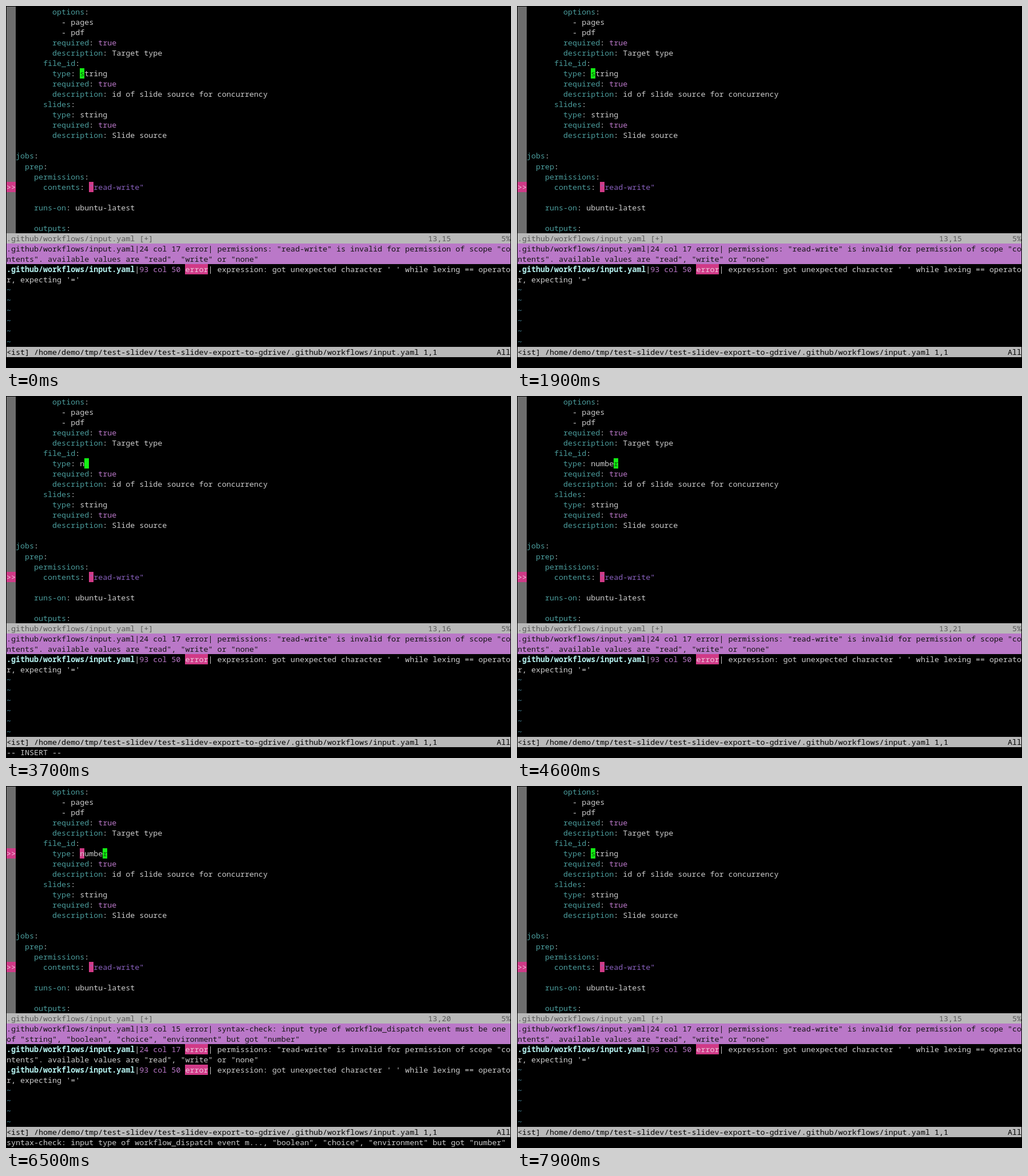
Write an HTML page with a canvas that moves like this. It is 883 px wide and 634 px high and loops after 8000 ms.

```html
<!DOCTYPE html>
<html lang="en">
<head>
<meta charset="utf-8">
<title>Linting a workflow in a terminal editor</title>
<style>
html, body { margin: 0; width: 100%; height: 100%; overflow: hidden; background: #000; }
canvas { display: block; }
</style>
</head>
<body>
<canvas id="screen" width="883" height="634"></canvas>
<script>
const ctx = document.getElementById('screen').getContext('2d');
const LOOP = 8000, COLS = 110, CELL_W = 8.01, CELL_H = 18.06;
const FONT = '13.35px "Noto Sans Mono", "DejaVu Sans Mono", monospace';
const C = {
  text: '#cccccc', key: '#4b9c9c', value: '#ba78c8', quoted: '#8860bd', pink: '#d03a87',
  gutter: '#6e6e6e', bar: '#b9b9b9', dim: '#585858', file: '#b4f0ee', tilde: '#4a8fa3',
  cursor: '#14f014', ink: '#141414', pale: '#f0c8e0'
};

const FILE = '.github/workflows/input.yaml';
const YAML = `        options:
          - pages
          - pdf
        required: true
        description: Target type
      file_id:
        type: string
        required: true
        description: id of slide source for concurrency
      slides:
        type: string
        required: true
        description: Slide source

jobs:
  prep:
    permissions:
      contents: "read-write"

    runs-on: ubuntu-latest

    outputs:`.split('\n');

const TYPE_ISSUE = ['13 col 15', 'syntax-check: input type of workflow_dispatch event must be one of "string", "boolean", "choice", "environment" but got "number"'];
const ISSUES = [
  ['24 col 17', 'permissions: "read-write" is invalid for permission of scope "contents". available values are "read", "write" or "none"'],
  ['93 col 50', "expression: got unexpected character ' ' while lexing == operator, expecting '='"]
];
const MESSAGE = 'syntax-check: input type of workflow_dispatch event m..., "boolean", "choice", "environment" but got "number"';

// Editing timeline, in ms
const CHANGE = 2900, TYPE = 3600, KEY_GAP = 120, ESCAPE = 4600, RULER = 4700, LINT = 5500, UNDO = 6600;

const colX = col => Math.round(1 + col * CELL_W);
const rowY = row => Math.round(0.6 + row * CELL_H);

function fill(row, col, cols, color) {
  ctx.fillStyle = color;
  ctx.fillRect(colX(col), rowY(row), colX(col + cols) - colX(col), rowY(row + 1) - rowY(row));
}

// Writes text on the cell grid, wrapping at the right edge; returns the end position
function put(row, col, text, color, bg, bold) {
  ctx.font = (bold ? '600 ' : '') + FONT;
  for (const ch of text) {
    if (col >= COLS) { col = 0; row++; }
    if (bg) fill(row, col, 1, bg);
    ctx.fillStyle = color;
    if (ch !== ' ') ctx.fillText(ch, 1 + col * CELL_W, rowY(row) + 14);
    col++;
  }
  return [row, col];
}

function drawYaml(row, line) {
  const m = line.match(/^(\s*)([\w-]+)(:)(.*)$/);
  if (!m) return put(row, 2, line, C.text);
  const [, indent, key, colon, value] = m;
  const color = value === ' true' ? C.value : value.includes('"') ? C.quoted : C.text;
  let [, col] = put(row, 2 + indent.length, key, C.key);
  [, col] = put(row, col, colon, C.text);
  put(row, col, value, color);
}

function mark(row, col, ch, color) {
  put(row, 0, '>>', C.pale, C.pink);
  put(row, col, ch, color, C.pink);
}

function drawIssue(row, [place, text], selected) {
  const parts = [
    [FILE, C.file, null, true], ['|', C.text], [place + ' ', C.value],
    ['error', C.pale, C.pink], ['| ' + text, C.text]
  ];
  if (selected) {
    fill(row, 0, COLS, C.value);
    fill(row + 1, 0, COLS, C.value);
  }
  let pos = [row, 0];
  for (const [part, color, bg, bold] of parts)
    pos = selected ? put(...pos, part, C.ink) : put(...pos, part, color, bg, bold);
  return pos[0] + 1;
}

function stateAt(t) {
  if (t < CHANGE || t >= UNDO) return { word: 'string', cursor: 0, ruler: 15 };
  const typed = Math.max(0, Math.min(6, Math.floor((t - TYPE) / KEY_GAP) + 1));
  const insert = t < ESCAPE, linted = t >= LINT;
  return {
    word: 'number'.slice(0, typed),
    cursor: insert ? typed : 5,
    ruler: t < RULER ? 15 + typed : 20,
    linted,
    message: insert ? '-- INSERT --' : linted ? MESSAGE : ''
  };
}

function draw(t) {
  const s = stateAt(t);
  ctx.fillStyle = '#000';
  ctx.fillRect(0, 0, 883, 634);

  YAML.forEach((line, row) => {
    fill(row, 0, 2, C.gutter);
    drawYaml(row, row === 6 ? '        type: ' + s.word : line);
  });
  mark(17, 18, '"', C.quoted);
  if (s.linted) mark(6, 16, 'n', C.text);
  const under = s.word[s.cursor] || ' ';
  put(6, 16 + s.cursor, under, '#0a5a0a', C.cursor);

  fill(22, 0, COLS, C.bar);
  put(22, 0, FILE + ' [+]', C.dim);
  put(22, 92, '13,' + s.ruler, C.dim);
  put(22, 108, '5%', C.dim);

  let row = 23;
  (s.linted ? [TYPE_ISSUE, ...ISSUES] : ISSUES).forEach((issue, i) => {
    row = drawIssue(row, issue, i === 0);
  });
  while (row < 33) put(row++, 0, '~', C.tilde);

  fill(33, 0, COLS, C.bar);
  put(33, 0, '<ist] /home/demo/tmp/test-slidev/test-slidev-export-to-gdrive/' + FILE + ' 1,1', '#000');
  put(33, 107, 'All', '#000');
  put(34, 0, s.message || '', C.text);
}

const begin = performance.now();
function tick() {
  draw((performance.now() - begin) % LOOP);
  requestAnimationFrame(tick);
}
tick();
</script>
</body>
</html>
```
